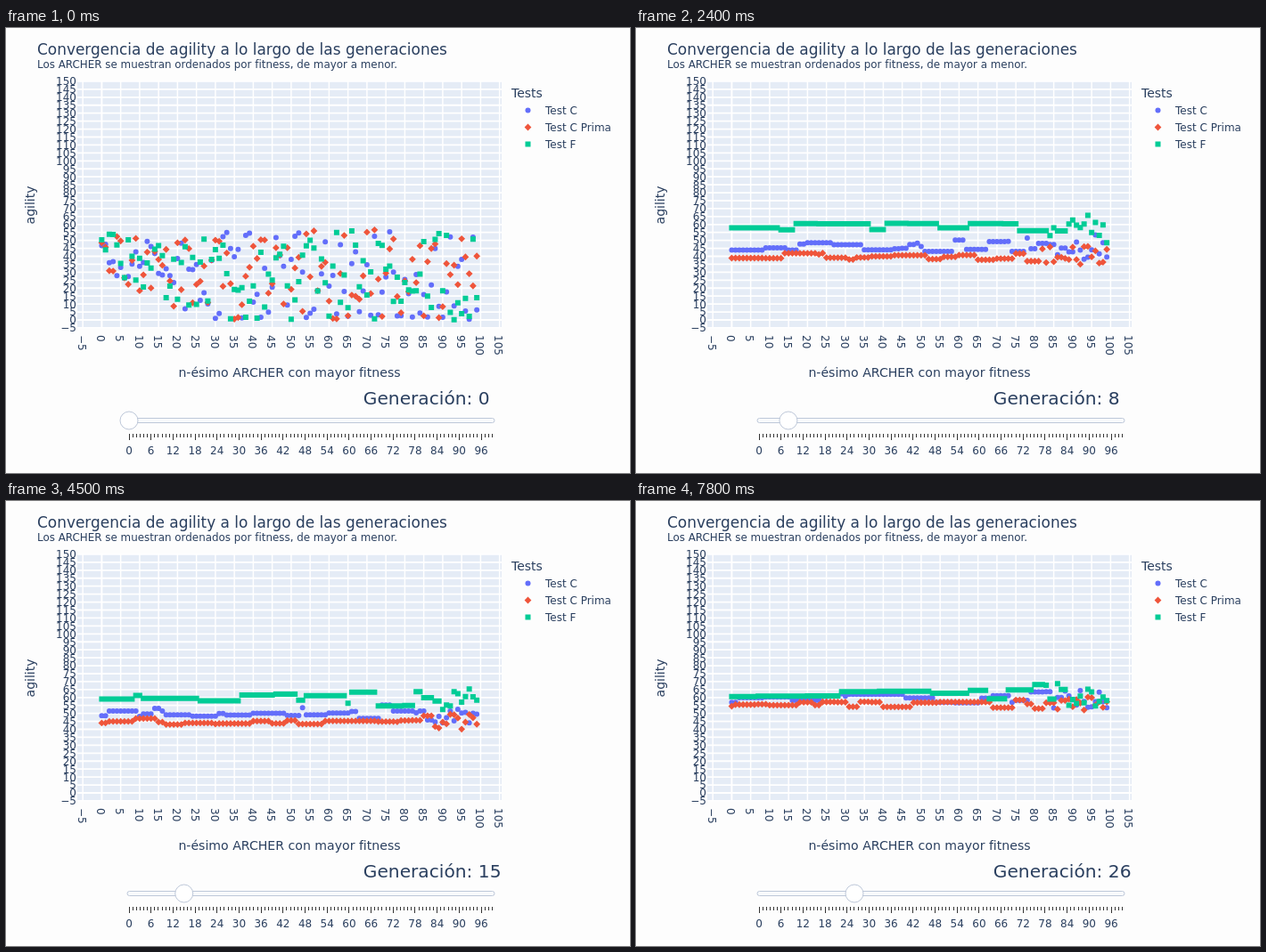
Animation, 700 px wide and 500 px high, one loop 8 s. Source, as an HTML page:

```html
<!DOCTYPE html>
<html lang="es">
<head>
<meta charset="utf-8">
<title>Convergencia</title>
<style>
html, body { margin: 0; width: 100%; height: 100%; overflow: hidden; background: #fdfdfd; }
svg { display: block; width: 700px; height: 500px; }
text { font-family: Verdana, "DejaVu Sans", sans-serif; font-size: 12px; fill: #2a3f5f; white-space: pre; }
</style>
</head>
<body>
<svg id="stage" viewBox="0 0 700 500"></svg>
<script>
const STEP = 300, LOOP = 8000, COUNT = 100;
const stage = document.getElementById('stage');
const px = v => 107.4 + 4.25 * v;
const py = v => 328 - 1.787 * v;
const tickX = n => 138 + 4.115 * n;

function add(tag, attrs, text) {
  const el = document.createElementNS('http://www.w3.org/2000/svg', tag);
  for (const k in attrs) el.setAttribute(k, attrs[k]);
  if (text !== undefined) el.textContent = text;
  return stage.appendChild(el);
}
const label = (x, y, text, size = 12, extra = {}) =>
  add('text', { x, y, style: `font-size:${size}px`, ...extra }, text);
const line = (d, stroke, width) => add('path', { d, stroke, 'stroke-width': width, fill: 'none' });
const signed = v => String(v).replace('-', '\u2212');

// levels: typical agility at each generation in KEYS
// wobble, run: height spread and greatest length of the plateaus; tail: scatter of the least fit
const KEYS = [0, 4, 8, 12, 15, 19, 26];
const series = [
  { name: 'Test C', color: '#636efa', levels: [34, 40, 46, 52, 50.5, 55, 59.5],
    wobble: 3, run: 8, tail: 0.7,
    mark: (x, y) => `M${x - 3} ${y}a3 3 0 1 1 6 0a3 3 0 1 1 -6 0z` },
  { name: 'Test C Prima', color: '#ef553b', levels: [34, 39.5, 40, 42.5, 45, 52.5, 56],
    wobble: 2, run: 9, tail: 0.55,
    mark: (x, y) => `M${x - 3.9} ${y}l3.9 -3.9l3.9 3.9l-3.9 3.9z` },
  { name: 'Test F', color: '#00cc96', levels: [50, 56.5, 59, 59, 60, 61, 62],
    wobble: 2.5, run: 14, tail: 1,
    mark: (x, y) => `M${x - 3} ${y - 3}h6v6h-6z` }
];

function seeded(seed) {
  let s = seed * 7919 + 17;
  return () => (s = (s * 16807) % 2147483647) / 2147483647;
}

function levelAt(levels, gen) {
  const k = Math.max(1, KEYS.findIndex(g => g >= gen));
  const u = (gen - KEYS[k - 1]) / (KEYS[k] - KEYS[k - 1]);
  return levels[k - 1] + (levels[k] - levels[k - 1]) * u;
}

// The fittest settle into plateaus from the left; the rest stay scattered
function population({ levels, wobble, run, tail }, gen, index) {
  const rand = seeded(31 * index + 101 * gen + 5);
  const spread = () => 2 * rand() - 1;
  for (let i = 0; i < 5; i++) rand();
  const level = levelAt(levels, gen);
  const settled = gen < 4 ? 25 * gen : COUNT;
  const looseness = 5 + 14 * Math.exp((4 - gen) / 3);
  const out = [];
  while (out.length < COUNT) {
    const i = out.length;
    if (i >= settled) {
      const middle = 27 + 22 * Math.exp(-i / 9);
      const reach = (13 + 17 * Math.min(1, i / 35)) * (1 - gen / 8);
      out.push(Math.abs(middle + (level - middle) * gen / 4 + reach * spread()));
      continue;
    }
    const loose = Math.min(1, Math.max(0, (i - 50) / 40));
    const v = level + (wobble + looseness * tail * loose) * spread();
    const length = 1 + Math.floor(rand() * (run * (1 - loose) + 1));
    for (let n = 0; n < length && out.length < COUNT; n++) out.push(v);
  }
  return out;
}

// Plot area and grid
add('rect', { x: 80, y: 60, width: 476, height: 277, fill: '#e5ecf6' });
for (let v = -5; v <= 105; v += 5) {
  const x = px(v);
  line(`M${x} 60V337`, '#fff', v ? 1.5 : 2);
  label(0, 0, signed(v), 12, { transform: `translate(${x - 5.3} 345) rotate(90)` });
}
for (let v = -5; v <= 150; v += 5) {
  const y = py(v);
  line(`M80 ${y}H556`, '#fff', 1.8);
  label(79, y + 4.4, signed(v), 12, { 'text-anchor': 'end' });
}

// Titles and legend
label(35, 30, 'Convergencia de agility a lo largo de las generaciones', 16.95);
label(35, 45, 'Los ARCHER se muestran ordenados por fitness, de mayor a menor.', 11.9);
label(318, 392, 'n-ésimo ARCHER con mayor fitness', 14.1, { 'text-anchor': 'middle' });
label(0, 0, 'agility', 14, { 'text-anchor': 'middle', transform: 'translate(32 199) rotate(-90)' });
label(567, 78, 'Tests', 14);
series.forEach(({ name, color, mark }, s) => {
  add('path', { d: mark(585.5, 92.5 + 19 * s), fill: color });
  label(605, 97 + 19 * s, name);
});

// Slider
add('rect', { x: 136, y: 438.5, width: 412, height: 5, rx: 2.5, fill: '#f8fafc', stroke: '#bec8d9' });
for (let n = 0; n < COUNT; n++) {
  const major = n % 6 === 0, x = Math.floor(tickX(n)) + 0.5;
  line(`M${x} 456v${major ? 7 : 4}`, '#333', 1);
  if (major) label(tickX(n), 479, n, 12, { 'text-anchor': 'middle' });
}

const clouds = series.map(({ color }) => add('path', { fill: color }));
const grip = add('circle', { cy: 441, r: 10, fill: '#fff', stroke: '#bec8d9' });
const counter = label(400.8, 422.5, '', 20.2);

let shown = -1;
function draw() {
  const gen = Math.floor((performance.now() % LOOP) / STEP);
  if (gen !== shown) {
    shown = gen;
    series.forEach((s, n) => {
      const marks = population(s, gen, n).map((v, i) => s.mark(px(i), py(v)));
      clouds[n].setAttribute('d', marks.join(''));
    });
    grip.setAttribute('cx', tickX(gen));
    counter.textContent = 'Generación: ' + gen;
  }
  requestAnimationFrame(draw);
}
draw();
</script>
</body>
</html>
```
